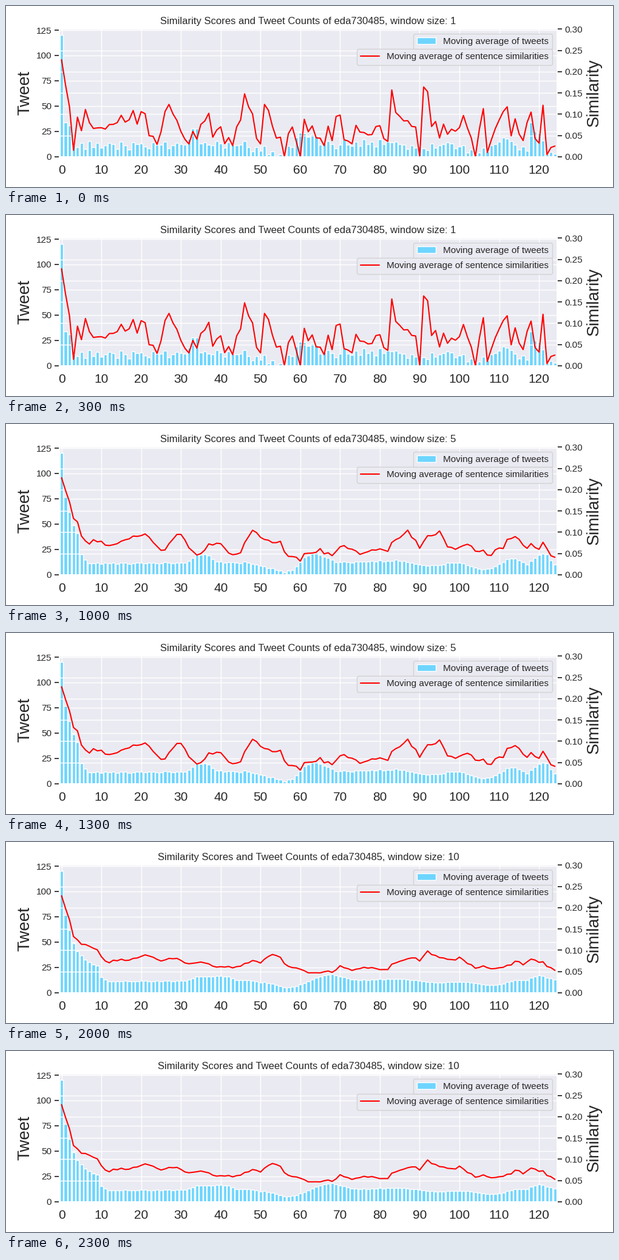
Animation, 1000 px wide and 300 px high, one loop 2500 ms. Source, as a matplotlib script:

```python
import matplotlib.pyplot as plt
import numpy as np
from matplotlib.animation import FuncAnimation

INK = ".15"
WINDOWS = [1, 3, 5, 7, 10]
DAYS = np.arange(125)

plt.rcParams.update({
    "font.family": "Liberation Sans", "font.size": 12,
    "text.color": INK, "axes.labelcolor": INK,
    "xtick.color": INK, "ytick.color": INK,
    "axes.facecolor": "#EAEAF2", "axes.edgecolor": "white",
    "axes.linewidth": 1.25, "axes.axisbelow": True, "axes.titlesize": 12,
    "axes.grid": True, "grid.color": "white", "grid.linewidth": 1,
    "lines.solid_capstyle": "round", "legend.fontsize": 11,
    "xtick.bottom": False, "ytick.left": False,
    "xtick.labelsize": 15, "ytick.labelsize": 11,
    "xtick.major.size": 6, "ytick.major.size": 6, "ytick.major.width": 1.25,
})

# Turning points as (day, value)
TWEET_TURNS = [
    (0, 120), (1, 34), (2, 31), (3, 11), (31, 12), (33, 28), (34, 28), (35, 13),
    (45, 12), (50, 6), (56, 1), (60, 24), (63, 22), (65, 12), (83, 14), (91, 8),
    (98, 13), (104, 3), (112, 18), (117, 6), (118, 34), (121, 16), (122, 2), (124, 3),
]
SIMILARITY_TURNS = [
    (0, .228), (2, .117), (3, .015), (4, .093), (11, .065), (20, .106), (24, .029),
    (27, .123), (32, .03), (36, .084), (43, .026), (46, .148), (50, .03), (51, .123),
    (56, 0), (58, .07), (60, 0), (61, .088), (66, .026), (70, .098), (71, .04),
    (80, .073), (82, .036), (83, .157), (84, .104), (89, .07), (90, 0), (91, .164),
    (92, .153), (93, .071), (99, .06), (101, .097), (104, 0), (106, .113), (107, .01),
    (111, .106), (116, .038), (118, .105), (120, .032), (121, .121), (122, .005), (124, .025),
]


def daily_series(turns, jitter, seed):
    """Join the turning points and add jitter that averages out over a few days."""
    turn_days, values = zip(*turns)
    noise = np.random.default_rng(seed).uniform(-jitter, jitter, len(DAYS) + 1)
    wobble = np.diff(noise)
    wobble[list(turn_days)] = 0
    return np.clip(np.interp(DAYS, turn_days, values) + wobble, 0, None)


def trailing_mean(values, window):
    return [values[max(0, day - window + 1):day + 1].mean() for day in DAYS]


def title_for(window):
    return f"Similarity Scores and Tweet Counts of eda730485, window size: {window}"


tweets = daily_series(TWEET_TURNS, jitter=3, seed=4)
similarities = daily_series(SIMILARITY_TURNS, jitter=0.016, seed=7)

fig, ax = plt.subplots(figsize=(10, 3), dpi=100)
bars = ax.bar(DAYS, tweets, color="#6DD5FF", edgecolor="white", linewidth=1,
              label="Moving average of tweets")
ax.set_xlim(-0.5, len(DAYS) - 0.5)
ax.set_ylim(0, 126)
ax.set_xticks(range(0, 121, 10))
ax.set_yticks(range(0, 126, 25))
ax.set_ylabel("Tweet", fontsize=20)
title = ax.set_title(title_for(WINDOWS[0]))
ax.legend(loc="upper right")

ax_sim = ax.twinx()
line, = ax_sim.plot(DAYS, similarities, color="red", lw=1.5,
                    label="Moving average of sentence similarities")
ax_sim.set_ylim(0, 0.3)
ax_sim.set_yticks(np.arange(7) * 0.05)
ax_sim.set_ylabel("Similarity", fontsize=20)
ax_sim.legend(loc="upper right", bbox_to_anchor=(1, 0.88))
fig.tight_layout()


def update(frame):
    window = WINDOWS[frame]
    for bar, height in zip(bars, trailing_mean(tweets, window)):
        bar.set_height(height)
    line.set_ydata(trailing_mean(similarities, window))
    title.set_text(title_for(window))
    return [*bars, line, title]


anim = FuncAnimation(fig, update, frames=len(WINDOWS), interval=500, repeat=True)
plt.show()
```
